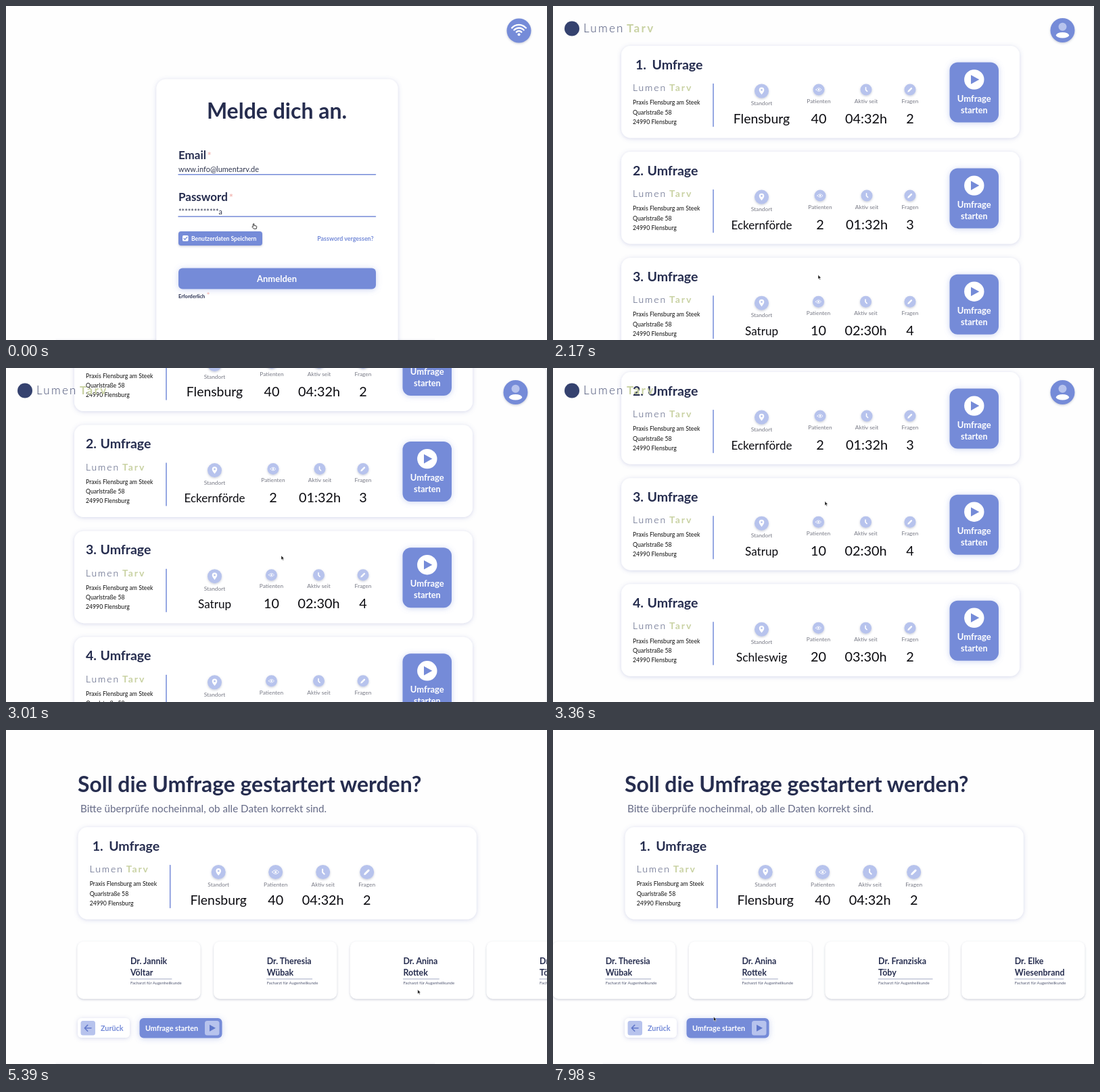
These frames come from a looping animation (800 px wide and 495 px high, 8 s). An HTML page:

```html
<!DOCTYPE html>
<html lang="de">
<head>
<meta charset="utf-8">
<title>Umfrage starten</title>
<style>
  html, body { margin: 0; width: 100%; height: 100%; overflow: hidden; background: #fefefe; }
  svg { display: block; width: 100vw; height: 100vh; }
  text { font-family: Lato, "Open Sans", sans-serif; white-space: pre; }
</style>
</head>
<body>
<svg id="stage" viewBox="0 0 800 495" xmlns="http://www.w3.org/2000/svg">
  <defs>
    <filter id="soft" x="-20%" y="-30%" width="140%" height="160%">
      <feDropShadow dx="0" dy="1" stdDeviation="3.2" flood-color="#5f6bb5" flood-opacity=".27"/>
    </filter>
    <filter id="glow" x="-30%" y="-50%" width="160%" height="200%">
      <feDropShadow dx="0" dy="1" stdDeviation="4.5" flood-color="#758bd8" flood-opacity=".38"/>
    </filter>
    <filter id="lift" x="-20%" y="-30%" width="140%" height="160%">
      <feDropShadow dx="0" dy="1.2" stdDeviation="1.7" flood-color="#50587f" flood-opacity=".32"/>
    </filter>
  </defs>
</svg>
<script>
const BLUE = '#758bd8', PALE = '#b7c3ed', NAVY = '#262d4f', OLIVE = '#c9d2a3', GREY = '#777985';
const LOOP = 8000, STEP = 70;
const stage = document.getElementById('stage');

const text = (x, y, size, str, { fill = NAVY, weight = 400, anchor = 'start', spacing = 0 } = {}) =>
  `<text x="${x}" y="${y}" font-size="${size}" fill="${fill}" font-weight="${weight}" text-anchor="${anchor}" letter-spacing="${spacing}">${str}</text>`;
const box = (x, y, w, h, r, fill = '#fff', filter = '') =>
  `<rect x="${x}" y="${y}" width="${w}" height="${h}" rx="${r}" fill="${fill}"${filter && ` filter="url(#${filter})"`}/>`;
const disc = (x, y, r, fill, filter = '') =>
  `<circle cx="${x}" cy="${y}" r="${r}" fill="${fill}"${filter && ` filter="url(#${filter})"`}/>`;
const stroke = (d, color, width = 1.5) =>
  `<path d="${d}" fill="none" stroke="${color}" stroke-width="${width}" stroke-linecap="round" stroke-linejoin="round"/>`;
const shape = (d, fill) => `<path d="${d}" fill="${fill}"/>`;
const page = (id, body) => `<g id="${id}">${box(0, 0, 800, 495, 0, '#fefefe')}${body}</g>`;
const floorLine = stroke('M74 494H634', '#f1f1f6', 1);

const wordmark = (x, y, size, spacing, gap) =>
  text(x, y, size, 'Lumen', { fill: '#414a70', weight: 300, spacing }) +
  text(x + gap, y, size, 'Tarv', { fill: OLIVE, weight: 700, spacing });

const glyphs = {
  pin: '<path d="M0 5.2C-2.4 2-3.8.4-3.8-1.6a3.8 3.8 0 0 1 7.6 0C3.8.4 2.4 2 0 5.2Z" fill="#fff"/>' + disc(0, -1.6, 1.4, PALE),
  eye: stroke('M-5 0Q0-6 5 0Q0 6-5 0Z', '#fff', 1) + disc(0, 0, 1.6, '#fff'),
  clock: stroke('M-.6-4V.4L2 3', '#fff', 2),
  pen: stroke('M-2.3 2.3L2.4-2.4', '#fff', 3) + shape('M-4.6 4.6L-3.8 1.4L-1.4 3.8Z', '#fff')
};
const icon = (name, x, y, r) =>
  disc(x, y, r, PALE, 'lift') + `<g transform="translate(${x} ${y}) scale(${r / 10.5})">${glyphs[name]}</g>`;

const surveys = [
  { city: 'Flensburg', size: 19.4, patients: 40, since: '04:32h', questions: 2, cols: [393, 463] },
  { city: 'Eckernförde', size: 17, patients: 2, since: '01:32h', questions: 3, cols: [395, 464] },
  { city: 'Satrup', size: 17.1, patients: 10, since: '02:30h', questions: 4, cols: [392.5, 462.5] },
  { city: 'Schleswig', size: 17.5, patients: 20, since: '03:30h', questions: 2, cols: [392.5, 462.5] }
];

// Card content is laid out from the top of the card; `large` is the confirmation layout.
function surveyCard(s, i, large = false) {
  const mid = { anchor: 'middle' };
  const columns = [
    ['pin', 'Standort', s.city, 308.5], ['eye', 'Patienten', s.patients, s.cols[0]],
    ['clock', 'Aktiv seit', s.since, s.cols[1]], ['pen', 'Fragen', s.questions, 528]
  ];
  const first = i === 0;
  let out = box(101, 0, 589, 136.5, 14, '#fff', 'soft');
  out += text(first ? 122 : 118, 34.5, 19.5, `${i + 1}.`, { weight: 700 });
  out += text(first ? 146.5 : 139.5, 34.5, 19.5, 'Umfrage', { weight: 700 });
  out += wordmark(118, 67, 14, 1.9, 54);
  ['Praxis Flensburg am Steek', 'Quarlstraße 58', '24990 Flensburg'].forEach((line, n) => {
    out += text(118, 87.3 + n * 14.2, 8.7, line, { fill: '#111' });
  });
  out += stroke('M237 56.5V119.5', BLUE);
  columns.forEach(([name, label, value, x], n) => {
    const wide = large || n === 0;
    out += icon(name, x, large ? 66.5 : n ? 65 : 67, wide ? 10.5 : 8.5);
    out += text(x, wide ? 88.3 : 84.8, 8.4, label, { ...mid, fill: GREY });
    out += text(x, 114.5, n ? 19.8 : s.size, value, { ...mid, fill: '#0b0b10' });
  });
  if (!large) {
    out += box(586.5, 24.5, 72.5, 89, 12, BLUE, 'glow') + disc(622.8, 50, 14.7, '#fff') +
      shape('M618 43.2V56.8L630.3 50Z', BLUE) +
      text(622.8, 82.5, 13, 'Umfrage', { ...mid, fill: '#fff', weight: 700 }) +
      text(622.8, 99.5, 12.6, 'starten', { ...mid, fill: '#fff', weight: 700 });
  }
  return out;
}

function loginPage() {
  const star = (x, y, size = 15) => text(x, y, size, '*', { fill: '#f0a9a4' });
  const arc = r => `M${758.5 - r * .74} ${42 - r * .68}A${r} ${r} 0 0 1 ${758.5 + r * .74} ${42 - r * .68}`;
  return page('login',
    floorLine + box(222.5, 108.5, 357, 420, 14, '#fff', 'soft') +
    disc(758.5, 36.5, 18, BLUE, 'lift') + disc(758.5, 42.3, 2, '#fff') +
    [5, 9.5, 14].map(r => stroke(arc(r), '#fff', 2.4)).join('') +
    text(400.5, 166.5, 32, 'Melde dich an.', { weight: 700, anchor: 'middle' }) +
    text(255, 226.5, 17, 'Email', { weight: 700 }) + star(297.5, 227) +
    text(255, 246, 11, 'www.info@lumentarv.de', { fill: '#30364f' }) + stroke('M255 249.7H546.5', BLUE) +
    text(255, 289, 17, 'Password', { weight: 700 }) + star(329.8, 289) +
    text(255, 308.5, 10.8, '*************a', { fill: '#30364f' }) + stroke('M255 312H546.5', BLUE) +
    box(255, 334, 124, 21, 4, BLUE, 'lift') + box(261, 340, 8.6, 8.6, 1.5) +
    stroke('M263 344.4L264.7 346.2L267.8 342.4', BLUE, 1.3) +
    text(274, 347.7, 8.6, 'Benutzerdaten Speichern', { fill: '#fff', weight: 700 }) +
    text(543.5, 347.7, 8.9, 'Password vergessen?', { fill: BLUE, weight: 700, anchor: 'end' }) +
    box(255, 388.5, 292, 31, 6, BLUE, 'glow') +
    text(400.5, 408.8, 13, 'Anmelden', { fill: '#fff', weight: 700, anchor: 'middle' }) +
    text(255, 433.2, 7.5, 'Erforderlich', { weight: 700 }) + star(296.5, 433, 12));
}

function listPage() {
  const cards = surveys.map((s, i) => `<g transform="translate(0 ${59 + 157.1 * i})">${surveyCard(s, i)}</g>`).join('');
  return page('list',
    `<g id="cards">${cards}</g>` + stroke('M794 0Q799.3 0 799.3 6V495', '#e3e4ec', 1) +
    disc(28, 33.5, 11, '#35426f') + wordmark(45, 39, 17, 2.3, 64) +
    disc(753.5, 36, 18, BLUE, 'lift') + disc(753.5, 30.7, 6, PALE) +
    '<ellipse cx="753.5" cy="43.3" rx="9.6" ry="4.3" fill="#fff"/>');
}

function confirmPage() {
  const doctors = [
    ['Jannik', 'Völtar', 61], ['Theresia', 'Wübak', 67], ['Anina', 'Rottek', 53],
    ['Franziska', 'Töby', 80], ['Elke', 'Wiesenbrand', 72]
  ];
  const staff = doctors.map(([first, last, rule], i) => `<g transform="translate(${105 + 201.7 * i} 313)">` +
    box(.5, .5, 182, 85, 9, '#fff', 'lift') +
    text(79, 33.7, 12.4, `Dr. ${first}`, { weight: 700 }) + text(79, 50.8, 12.4, last, { weight: 700 }) +
    stroke(`M79 56H${79 + rule}`, '#a3a9c4', 1) +
    text(79, 63.8, 6.05, 'Facharzt für Augenheilkunde', { fill: '#555b75' }) + '</g>').join('');
  return page('confirm',
    floorLine + text(106, 91.5, 31.9, 'Soll die Umfrage gestartert werden?', { weight: 700 }) +
    text(110, 122, 15.2, 'Bitte überprüfe nocheinmal, ob alle Daten korrekt sind.', { fill: '#666b87' }) +
    `<g transform="translate(5.7 144)">${surveyCard(surveys[0], 0, true)}</g><g id="staff">${staff}</g>` +
    box(106, 427, 77, 29, 6, '#fff', 'soft') + box(110.5, 431, 21.5, 21.5, 3.5, PALE) +
    stroke('M126 441.8H116.5M120.7 437.4L116.3 441.8L120.7 446.2', '#6379cb', 1.6) +
    text(140, 446, 10.8, 'Zurück', { fill: BLUE, weight: 700 }) +
    box(197.5, 427, 122, 29.5, 6, BLUE, 'glow') +
    text(206, 446, 10.8, 'Umfrage starten', { fill: '#fff', weight: 700 }) +
    box(294, 431, 21.5, 21.5, 3.5, PALE) + shape('M301 436.8V446.8L310 441.8Z', '#5f77cb'));
}

const cursors =
  '<g id="arrow"><path d="M0 0V6.2L1.5 5L2.5 7.2L3.5 6.7L2.5 4.6H4.4Z" fill="#111" stroke="#fff" stroke-width=".5"/></g>' +
  '<g id="hand"><path d="M-1.6 0Q-.8-.9 0 0V2.4L3 3Q4 3.3 3.8 4.4L3.2 7.2H-.6L-3 4.4Q-2.8 3.2-1.6 4Z" fill="#fff" stroke="#222" stroke-width=".9" stroke-linejoin="round"/></g>';

stage.insertAdjacentHTML('beforeend', loginPage() + listPage() + confirmPage() + cursors);
const part = Object.fromEntries(['login', 'list', 'confirm', 'cards', 'staff', 'arrow', 'hand']
  .map(id => [id, document.getElementById(id)]));

const smooth = p => p * p * (3 - 2 * p);
const progress = (t, from, to) => smooth(Math.min(1, Math.max(0, (t - from) / (to - from))));

// Keys are [time, ...values]; each segment is eased.
function track(keys, t) {
  let i = 0;
  while (i < keys.length - 2 && t >= keys[i + 1][0]) i++;
  const [a, b] = [keys[i], keys[i + 1]];
  const p = progress(t, a[0], b[0]);
  return a.slice(1).map((v, n) => v + (b[n + 1] - v) * p);
}

const scrollKeys = [[2170, 0], [2730, 131.5], [3010, 131.5], [3360, 210], [3780, 190]];
const pointerKeys = [
  [0, 367, 323], [70, 367, 323], [420, 389, 390], [560, 389, 390], [770, 392, 398.5],
  [2170, 392, 398.5], [2730, 407.5, 297], [3010, 407, 278], [3360, 402, 197.5], [3500, 402, 197.5],
  [4060, 612, 390], [5250, 612, 390], [6020, 575, 330], [6160, 575, 330],
  [6930, 521.5, 368.5], [7000, 521.5, 368.5], [7700, 213.5, 375.5], [7840, 213.5, 375.5], [7980, 237.5, 425]
];

function fade(node, opacity) {
  node.style.display = opacity > 0 ? '' : 'none';
  node.setAttribute('opacity', opacity);
}

function draw(time) {
  const t = Math.floor(time / STEP) * STEP;
  const listIn = progress(t, 1330, 1890), confirmIn = progress(t, 4200, 4620);
  fade(part.login, listIn < 1 ? 1 : 0);
  fade(part.list, confirmIn < 1 ? listIn : 0);
  fade(part.confirm, confirmIn);
  part.cards.setAttribute('transform', `translate(0 ${-track(scrollKeys, t)[0]})`);
  part.staff.setAttribute('transform', `translate(${-308 * progress(t, 6930, 7700)} 0)`);

  const [x, y] = track(pointerKeys, t);
  const pointing = t < 1610 || (t >= 3990 && t < 4480);
  for (const node of [part.arrow, part.hand]) node.setAttribute('transform', `translate(${x} ${y})`);
  part.arrow.style.display = pointing ? 'none' : '';
  part.hand.style.display = pointing ? '' : 'none';
}

const start = performance.now();
function tick() {
  draw((performance.now() - start) % LOOP);
  requestAnimationFrame(tick);
}
draw(0);
requestAnimationFrame(tick);
</script>
</body>
</html>
```
